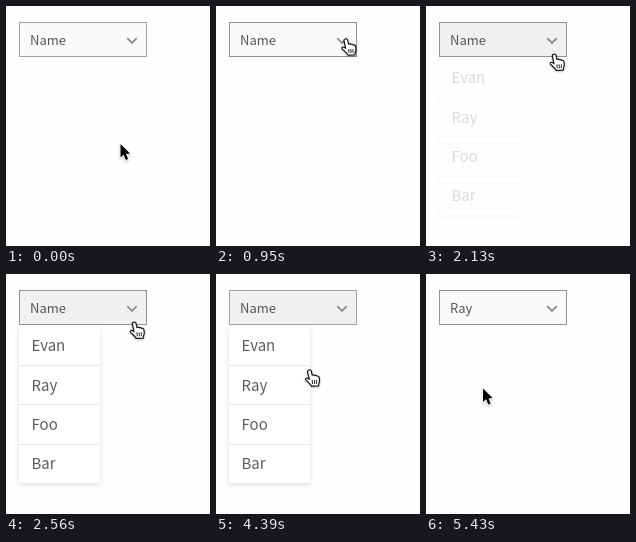
An HTML page for the animation above (6.43 s loop, 204 by 240 pixels).

```html
<!DOCTYPE html>
<html lang="en">
<head>
<meta charset="utf-8">
<title>Dropdown</title>
<style>
  html, body { margin: 0; width: 100%; height: 100%; overflow: hidden; background: #fefefe; }
  svg { display: block; width: 204px; height: 240px; }
  text { font-family: "Noto Sans CJK JP", "Noto Sans CJK SC", "Noto Sans", sans-serif; fill: #5c5c5c; }
  #value { font-size: 13px; fill: #555; }
  #list text { font-size: 15px; }
  #panel { filter: drop-shadow(0 2px 2.5px rgba(0, 0, 0, .13)); }
  #cursor { filter: drop-shadow(0 1px 1px rgba(0, 0, 0, .25)); }
</style>
</head>
<body>
<svg viewBox="0 0 204 240">
  <rect id="box" x="13.5" y="16.5" width="127" height="34"/>
  <text id="value" x="24" y="39">Name</text>
  <path d="M121.3 32.2l4.7 4.7 4.7-4.7" fill="none" stroke="#8c8c8c" stroke-width="1.8"/>
  <g id="list">
    <path id="panel" d="M13 53H94V207a2 2 0 0 1-2 2H15a2 2 0 0 1-2-2z" fill="#fff"/>
    <rect id="hover" x="13" y="92" width="81" height="39" fill="#e8f4f9"/>
    <path d="M13 91.5h81M13 130.5h81M13 170.5h81" stroke="#e8e8e8"/>
    <text x="25.5" y="77">Evan</text>
    <text id="pick" x="25.5" y="117">Ray</text>
    <text x="25.5" y="156">Foo</text>
    <text x="25.5" y="195">Bar</text>
  </g>
  <g id="cursor">
    <path id="arrow" d="M0 0V13.6L3.1 10.8 5.3 15.9 7.7 14.9 5.5 9.9 9.6 9.6z"
      stroke="#fff" stroke-width="1.6" paint-order="stroke"/>
    <g id="hand" transform="translate(-5 0)" stroke="#111" stroke-width="1.2" stroke-linejoin="round">
      <path fill="#fff" d="M4.2 1C5.3.4 6.5 1 6.8 2.3L7.6 6.2C8.4 5.5 9.6 5.6 10 6.5 10.8 6 12 6.2 12.4 7.1
        13.4 6.7 14.4 7.2 14.6 8.3L15 11C15.1 13 14.2 14 13.9 16.8L7 17.1C6 15 3.6 13.4 1.1 10.8
        .5 9.6 1.8 8.6 3 9.2L4.7 10.3 3 2.8C2.9 2 3.4 1.2 4.2 1z"/>
      <path fill="none" stroke-width=".9" d="M7.6 11l.4 4M9.8 11l.3 4M12 11v4"/>
    </g>
  </g>
</svg>
<script>
const LOOP = 6430;
const $ = id => document.getElementById(id);
const clamp = v => Math.min(1, Math.max(0, v));
const ramp = (t, a, b) => clamp((t - a) / (b - a));
const inOut = p => p * p * (3 - 2 * p);
const out = p => 1 - (1 - p) ** 2;

// start, end, x, y, easing
const moves = [
  [0, 40, 114.5, 138, inOut],
  [40, 300, 120.5, 69.5, out],
  [520, 930, 130, 32, inOut],
  [1170, 1690, 128, 40, inOut],
  [1690, 1780, 128, 41, out],
  [1820, 2040, 128.3, 47.3, out],
  [2560, 3080, 127.6, 47, inOut],
  [4040, 4600, 78, 117, inOut],
  [4600, 4860, 55.5, 119, out],
  [5100, 5340, 57, 114.5, inOut]
];

function cursorAt(t) {
  let [, , x, y] = moves[0];
  for (const [a, b, tx, ty, ease] of moves) {
    const p = ease(ramp(t, a, b));
    x += (tx - x) * p;
    y += (ty - y) * p;
  }
  return [x, y];
}

function mix(a, b, p) {
  return `rgb(${a.map((v, i) => Math.round(v + (b[i] - v) * p))})`;
}

function draw(t) {
  const [x, y] = cursorAt(t);
  const closed = ramp(t, 5340, 5420);
  const open = ramp(t, 2080, 2320) * (1 - closed);
  const press = ramp(t, 2060, 2120) * (1 - closed);
  const hover = ramp(t, 4490, 4630);
  const onBox = x > 13 && x < 141 && y > 16 && y < 51;
  const onList = t > 2100 && t < 5340 && x < 94 && y > 53;
  const hand = onBox || onList;

  $('box').setAttribute('fill', mix([250, 250, 250], [240, 240, 240], press));
  $('box').setAttribute('stroke', onBox || t >= 5340 ? '#929292' : '#a0a0a0');
  $('value').textContent = t < 5340 ? 'Name' : 'Ray';
  $('list').setAttribute('opacity', open);
  $('hover').setAttribute('opacity', hover);
  $('pick').style.fill = mix([92, 92, 92], [22, 86, 112], hover);
  $('cursor').setAttribute('transform', `translate(${x} ${y})`);
  $('arrow').setAttribute('visibility', hand ? 'hidden' : 'visible');
  $('hand').setAttribute('visibility', hand ? 'visible' : 'hidden');
}

const start = performance.now();
function tick() {
  draw((performance.now() - start) % LOOP);
  requestAnimationFrame(tick);
}
tick();
</script>
</body>
</html>
```
